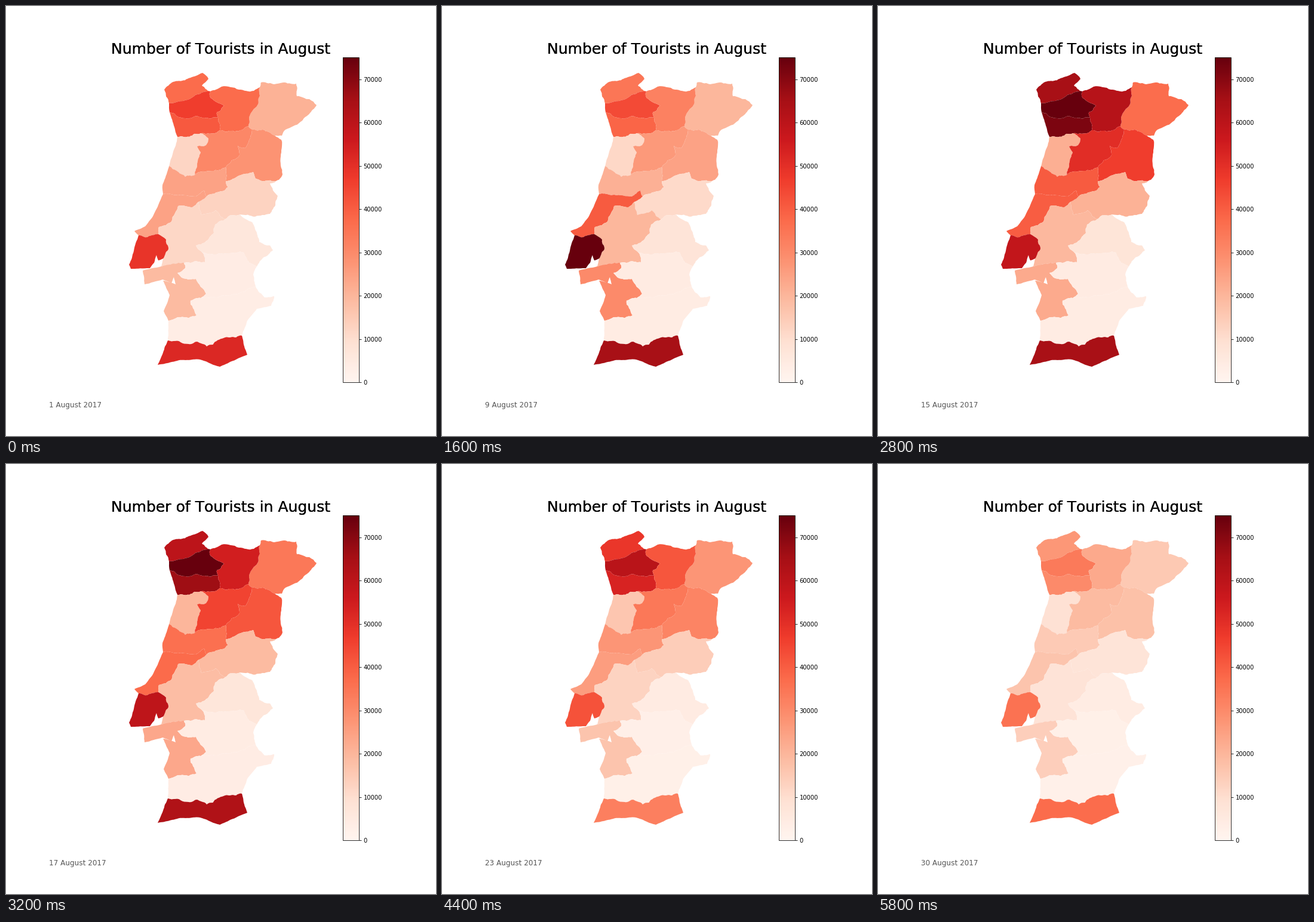
Animation of 720 by 720 pixels, one loop 6000 ms. Source, as a matplotlib script:

```python
import numpy as np
import matplotlib.pyplot as plt
from matplotlib.animation import FuncAnimation
from matplotlib.cm import ScalarMappable
from matplotlib.collections import PatchCollection
from matplotlib.colors import Normalize
from matplotlib.patches import Polygon

SIZE = 720
N_DAYS = 30
STEP_MS = 200

plt.rcParams["font.family"] = "DejaVu Sans"
plt.rcParams["text.kerning_factor"] = 6
rng = np.random.default_rng(8)

# Each zone follows one curve through the month, relative to day 1
KEY_DAYS = [1, 5, 9, 15, 17, 23, 30]
CURVES = {
    "north": [1, 1.58, 0.94, 1.75, 1.62, 1.3, 0.73],
    "inland": [1, 1.68, 0.87, 1.66, 1.48, 1.12, 0.62],
    "west": [1, 1.56, 1.66, 1.63, 1.53, 1.05, 0.68],
    "capital": [1, 1.18, 1.58, 1.2, 1.22, 0.87, 0.73],
    "plain": [1, 1.35, 1.2, 1.15, 1.07, 0.73, 0.65],
    "south": [1, 1.19, 1.25, 1.24, 1.21, 0.63, 0.71],
}

# Thousands of visitors on day 1
ZONES = {
    "north": {"VC": 37, "BR": 46.5, "PO": 41, "BG": 21, "AV": 12.3},
    "inland": {"VR": 37, "VS": 30.5, "GU": 28, "CO": 24.5, "CB": 12.7},
    "west": {"LE": 24.5, "SA": 12},
    "capital": {"LI": 48.7, "SE": 19},
    "plain": {"PT": 6.4, "EV": 3.9, "BE": 3.6},
    "south": {"FA": 52},
}

BASE = {d: (zone, n) for zone, group in ZONES.items() for d, n in group.items()}
ROUGHNESS = {"~": 0.04, "*": 0.1}
borders = {name: [] for name in BASE}


def fractal(a, b, amp):
    """Points after a up to b, by random midpoint displacement."""
    dx, dy = b[0] - a[0], b[1] - a[1]
    if np.hypot(dx, dy) < 4:
        return [b]
    s = rng.uniform(-amp, amp)
    mid = ((a[0] + b[0]) / 2 - s * dy, (a[1] + b[1]) / 2 + s * dx)
    return fractal(a, mid, amp) + fractal(mid, b, amp)


def arc(sides, *pts):
    """Border shared by two districts, or by one and the sea (~) or land (*)."""
    one, two = sides.split()
    line = [pts[0]]
    for a, b in zip(pts, pts[1:]):
        line += fractal(a, b, ROUGHNESS.get(two, 0.13))
    for name in (one, two):
        if name in borders:
            borders[name].append(line)


def ring(lines):
    """Chain border lines end to end into one outline."""
    path, rest = list(lines[0]), lines[1:]
    while rest:
        line = next(r for r in rest if path[-1] in (r[0], r[-1]))
        path += line[1:] if line[0] == path[-1] else line[-2::-1]
        rest = [r for r in rest if r is not line]
    return path


# North
arc("VC *", (273, 163), (265, 140), (280, 127), (318, 117), (329, 112), (339, 122),
    (328, 133), (342, 143))
arc("VC BR", (273, 163), (297, 159), (325, 147), (342, 143))
arc("VR *", (342, 143), (361, 135), (390, 140), (415, 142), (425, 136))
arc("BR VR", (342, 143), (341, 151), (351, 160), (365, 167), (353, 178), (355, 187))
arc("BR PO", (274, 178), (289, 186), (332, 187), (355, 187))
arc("BR ~", (273, 163), (274, 178))
arc("PO ~", (274, 178), (282, 203), (287, 219))
arc("PO VR", (355, 187), (358, 208))
arc("PO AV", (287, 219), (326, 213))
arc("PO VS", (326, 213), (358, 208))
arc("VR VS", (358, 208), (406, 201))
arc("VR BG", (425, 136), (425, 150), (420, 168), (411, 178), (406, 201))
arc("VS BG", (406, 201), (412, 207))
arc("BG *", (425, 136), (427, 128), (467, 128), (486, 130), (487, 151), (508, 156),
    (520, 166), (493, 194), (468, 207), (462, 217), (450, 217))
arc("GU BG", (412, 207), (430, 207), (450, 217))

# Centre
arc("GU *", (450, 217), (461, 224), (460, 252), (463, 282), (457, 291))
arc("VS GU", (412, 207), (409, 221), (400, 238), (388, 234), (391, 250), (368, 270))
arc("GU CO", (368, 270), (368, 293))
arc("GU CB", (368, 293), (390, 284), (414, 278), (418, 289), (457, 291))
arc("AV ~", (287, 219), (279, 248), (273, 268))
arc("AV VS", (326, 213), (339, 222), (335, 233), (320, 235), (326, 245), (316, 283))
arc("AV CO", (273, 268), (286, 276), (300, 286), (316, 283))
arc("VS CO", (316, 283), (345, 276), (368, 270))
arc("CO ~", (273, 268), (262, 300), (263, 315))
arc("CO LE", (263, 315), (300, 317), (318, 319), (332, 309), (336, 319))
arc("CO CB", (336, 319), (362, 310), (372, 303), (368, 293))
arc("LE CB", (336, 319), (322, 328))
arc("LE SA", (322, 328), (312, 337), (288, 335), (283, 347), (277, 361), (256, 370),
    (255, 382))
arc("LE ~", (263, 315), (246, 352), (233, 369), (215, 377), (222, 384))
arc("LE LI", (222, 384), (237, 387), (255, 382))
arc("CB SA", (322, 328), (327, 350), (351, 342), (367, 357))
arc("CB PT", (367, 357), (392, 349))
arc("CB *", (392, 349), (442, 348), (455, 318), (442, 297), (457, 291))

# Around the estuaries
arc("LI SA", (255, 382), (268, 391), (272, 405), (263, 423))
arc("LI ~", (222, 384), (214, 410), (206, 433), (209, 440), (241, 439), (248, 430),
    (252, 417), (255, 426), (263, 423))
arc("SA ~", (263, 423), (260, 436))
arc("SA SE", (260, 436), (298, 430))
arc("SE ~", (260, 436), (229, 443), (232, 466), (262, 458), (277, 464), (281, 454),
    (284, 466), (263, 460), (274, 484), (264, 511), (272, 527))
arc("SE EV", (298, 430), (300, 439), (287, 447), (297, 456), (318, 457), (335, 482),
    (326, 489))
arc("SE BE", (326, 489), (309, 493), (319, 518), (292, 521), (272, 527))

# South
arc("SA PT", (367, 357), (350, 366), (348, 380), (318, 401), (327, 411))
arc("SA EV", (327, 411), (333, 429), (298, 430))
arc("PT EV", (327, 411), (350, 417), (398, 412), (407, 430), (420, 436))
arc("PT *", (392, 349), (413, 363), (424, 395), (442, 401), (447, 409), (420, 436))
arc("EV *", (420, 436), (414, 450), (418, 470))
arc("EV BE", (326, 489), (375, 485), (418, 470))
arc("BE *", (418, 470), (433, 488), (449, 486), (444, 502), (420, 507), (395, 552))
arc("BE ~", (272, 527), (271, 560))
arc("BE FA", (271, 560), (320, 562), (336, 570), (375, 555), (395, 552))
arc("FA ~", (395, 552), (404, 584), (375, 596), (358, 604), (325, 592), (290, 593),
    (254, 601), (271, 560))

fig = plt.figure(figsize=(10, 10), dpi=72, facecolor="white")
ax = fig.add_axes([0, 0, 1, 1])
ax.set(xlim=(0, SIZE), ylim=(SIZE, 0))
ax.axis("off")

norm = Normalize(0, 75000)
cmap = plt.get_cmap("Reds")
districts = PatchCollection([Polygon(ring(b)) for b in borders.values()], linewidth=0)
ax.add_collection(districts)

# Stacked copies give the title its heavy edges
for _ in range(3):
    fig.text(0.5, 1 - 80.4 / SIZE, "Number of Tourists in August",
             fontsize=25, ha="center", va="baseline")
date = fig.text(0.1, 0.08, "", fontsize=12, color="#555555", ha="left", va="top")

cax = fig.add_axes([0.78375, 0.125, 0.755 / 20, 0.755])
fig.colorbar(ScalarMappable(norm, cmap), cax=cax)


def draw(i):
    day = i + 1
    level = {z: np.interp(day, KEY_DAYS, c) for z, c in CURVES.items()}
    districts.set_facecolor([cmap(norm(1000 * n * level[z])) for z, n in BASE.values()])
    date.set_text(f"{day} August 2017")
    return districts, date


anim = FuncAnimation(fig, draw, frames=N_DAYS, interval=STEP_MS,
                     repeat=True, repeat_delay=0)
plt.show()
```
